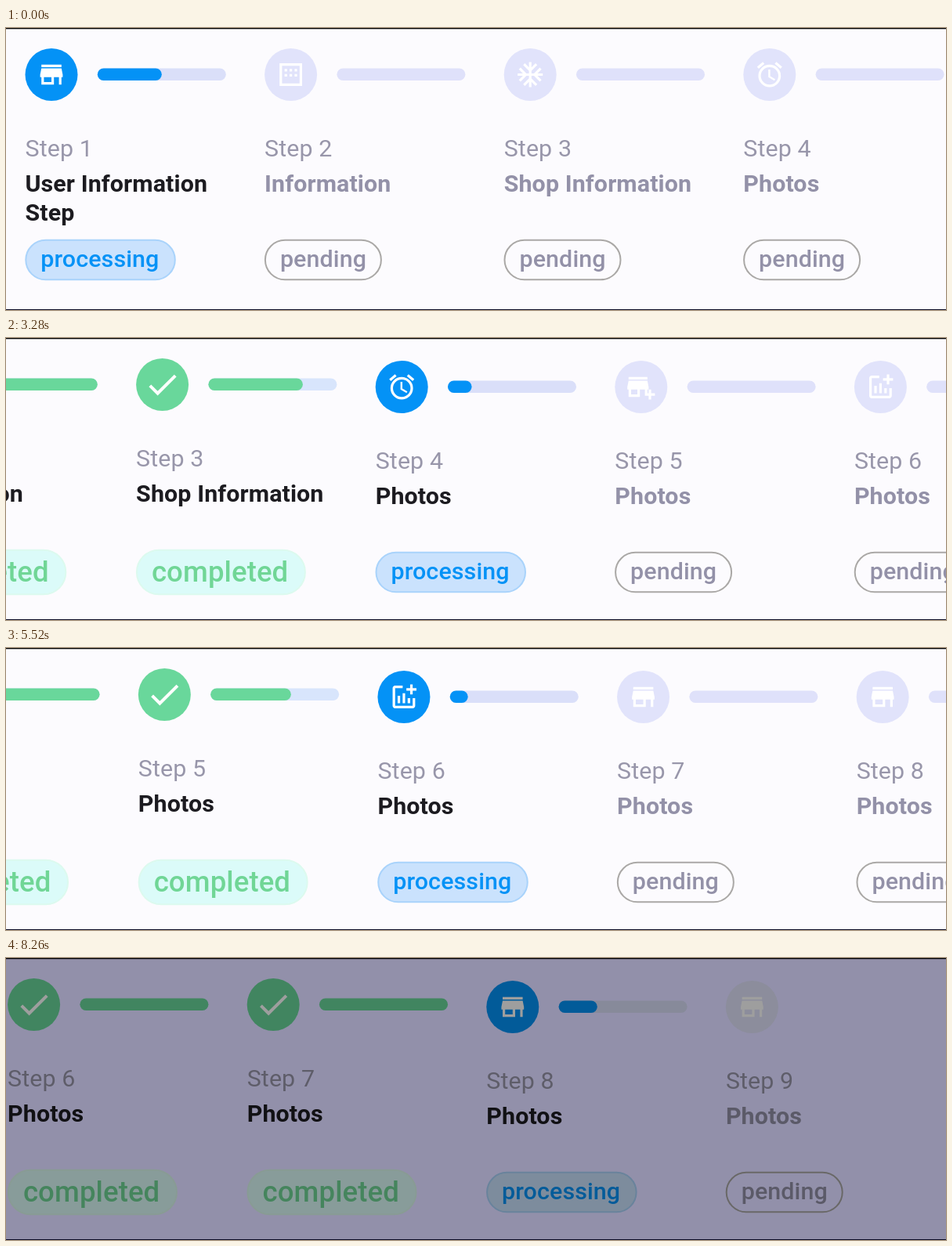
Write an HTML page that moves like this. It is 1200x360 px and loops after 8.32 s.

```html
<!DOCTYPE html>
<html lang="en">
<head>
<meta charset="utf-8">
<title>Horizontal stepper</title>
<style>
  html, body { margin: 0; width: 100%; height: 100%; overflow: hidden; background: #fcfbfe; }
  svg { display: block; width: 1200px; height: 360px; }
  text { font-family: Roboto, sans-serif; font-size: 30.4px; letter-spacing: .1px; }
  .label { fill: #9896aa; }
  .title { font-weight: 700; fill: #1c1b20; }
  .status { font-weight: 500; }
  .icon { fill: #fff; }
  .pill { stroke-width: 2; }

  .pending .title, .pending .status { fill: #9391a8; }
  .pending .disc { fill: #e1e3fb; }
  .pending .track { fill: #dfe1fa; }
  .pending .pill { fill: none; stroke: #aaa8a6; }

  .processing .disc, .processing .fill, .processing .status { fill: #0492f6; }
  .processing .track { fill: #dadff9; }
  .processing .pill { fill: #cae2fd; stroke: #a9d3fb; }

  .completed .disc, .completed .fill { fill: #69d79b; }
  .completed .track { fill: #d8e5fc; }
  .completed .pill { fill: #dbfbf9; stroke: #dcfaef; }
  .completed .status { fill: #70d696; font-size: 36.5px; }
</style>
</head>
<body>
<svg viewBox="0 0 1200 360">
  <rect width="1200" height="360" fill="#fcfbfe"/>
  <rect id="shade" width="1200" height="360" fill="#9290aa" opacity="0"/>
  <g id="strip"></g>
  <rect width="1200" height="1.3"/>
  <rect y="359" width="1200" height="1" fill="#0a0a24"/>
</svg>
<script>
const LOOP = 8320, PITCH = 305.6, VIEW = 1200, BAR = 164;
const FILL_TIME = 1000, SCROLL_TIME = 500;
const DIM_START = 7790, DIM_TIME = 150, DIM_DEPTH = .38;
// Moments at which the stepper advances to the next step.
const ADVANCES = [490, 2040, 2660, 3860, 5055, 6050, 6940];

const ICONS = {
  store: 'M20 4H4v2h16V4zm1 10v-2l-1-5H4l-1 5v2h1v6h10v-6h4v6h2v-6h1zm-9 4H6v-4h6v4z',
  calendar: 'M3 3h18v18H3zM5 5v14h14V5zM7 7.5h2v2H7zm4 0h2v2h-2zm4 0h2v2h-2zM7 11.5h2v2H7zm4 0h2v2h-2zm4 0h2v2h-2z',
  snow: 'M22 11h-4.17l3.24-3.24-1.41-1.42L15 11h-2V9l4.66-4.66-1.42-1.41L13 6.17V2h-2v4.17L7.76 2.93 6.34 4.34 11 9v2H9L4.34 6.34 2.93 7.76 6.17 11H2v2h4.17l-3.24 3.24 1.41 1.42L9 13h2v2l-4.66 4.66 1.42 1.41L11 17.83V22h2v-4.17l3.24 3.24 1.42-1.41L13 15v-2h2l4.66 4.66 1.41-1.42L17.83 13H22z',
  alarm: 'M22 5.72l-4.6-3.86-1.29 1.53 4.6 3.86zM7.88 3.39L6.6 1.86 2 5.71l1.29 1.53zM12.5 8H11v6l4.75 2.85.75-1.23-4-2.37zM12 4a9 9 0 0 0 0 18a9 9 0 0 0 0-18zm0 16a7 7 0 0 1 0-14a7 7 0 0 1 0 14z',
  addStore: 'M15 17h2v-3h1v-2l-1-5H2l-1 5v2h1v6h9v-6h4v3zm-6 1H4v-4h5v4zM2 4h15v2H2zM20 17v-3h-2v3h-3v2h3v3h2v-3h3v-2z',
  addChart: 'M22 5v2h-3v3h-2V7h-3V5h3V2h2v3h3zm-3 14H5V5h6V3H5c-1.1 0-2 .9-2 2v14c0 1.1.9 2 2 2h14c1.1 0 2-.9 2-2v-6h-2v6zm-4-6v4h2v-4h-2zm-4 4h2V9h-2v8zm-2 0v-6H7v6h2z',
  check: 'M9 16.17L4.83 12l-1.42 1.41L9 19 21 7l-1.41-1.41z'
};
const STEPS = [
  ['store', 'User Information', 'Step'],
  ['calendar', 'Information'],
  ['snow', 'Shop Information'],
  ['alarm', 'Photos'],
  ['addStore', 'Photos'],
  ['addChart', 'Photos'],
  ['store', 'Photos'],
  ['store', 'Photos'],
  ['store', 'Photos']
];
const PILLS = {
  pending: { width: 148, height: 50.5, baseline: 305 },
  processing: { width: 190.5, height: 50.5, baseline: 305 },
  completed: { width: 215, height: 56.5, baseline: 311 }
};

function add(parent, tag, attrs, text) {
  const el = document.createElementNS('http://www.w3.org/2000/svg', tag);
  set(el, attrs);
  if (text) el.textContent = text;
  return parent.appendChild(el);
}
function set(el, attrs) {
  for (const key in attrs) el.setAttribute(key, attrs[key]);
}

const strip = document.getElementById('strip');
const shade = document.getElementById('shade');

function buildStep([icon, ...lines], i) {
  const root = add(strip, 'g', {});
  const bar = { x: 92.3, y: 51.5, height: 15.5, rx: 7.75 };
  const isLast = i === STEPS.length - 1;
  add(root, 'circle', { class: 'disc', cx: 33.5, cy: 59.5, r: 33.5 });
  const step = { root, icon, status: '' };
  step.mark = add(root, 'path', { class: 'icon', 'fill-rule': 'evenodd' });
  // Bars connect neighbours, so the last step has none.
  add(root, 'rect', { class: 'track', width: isLast ? 0 : BAR, ...bar });
  step.fill = add(root, 'rect', { class: 'fill', width: 0, ...bar });
  add(root, 'text', { class: 'label', y: 163.5 }, `Step ${i + 1}`);
  lines.forEach((line, n) => add(root, 'text', { class: 'title', y: 209 + 37 * n }, line));
  step.pill = add(root, 'rect', { class: 'pill', x: .8, y: 270.8 });
  step.caption = add(root, 'text', { class: 'status', x: 19.8 });
  return step;
}
const steps = STEPS.map(buildStep);

function setStatus(step, status) {
  if (step.status === status) return;
  step.status = status;
  const done = status === 'completed';
  const { width, height, baseline } = PILLS[status];
  set(step.root, { class: status });
  set(step.mark, {
    d: ICONS[done ? 'check' : step.icon],
    transform: `translate(33.5 59.5) scale(${done ? 2 : 1.6}) translate(-12 -12)`
  });
  set(step.pill, { width, height, rx: height / 2 });
  set(step.caption, { y: baseline });
  step.caption.textContent = status;
}

const clamp = (v, lo = 0, hi = 1) => Math.min(hi, Math.max(lo, v));

// Cubic bezier (.42, 0, .58, 1)
function easeInOut(x) {
  let lo = 0, hi = 1;
  for (let n = 0; n < 20; n++) {
    const u = (lo + hi) / 2, v = 1 - u;
    if (3 * v * v * u * .42 + 3 * v * u * u * .58 + u ** 3 < x) lo = u; else hi = u;
  }
  return lo * lo * (3 - 2 * lo);
}

// Scroll position that centres a step, kept inside the strip.
const scrollFor = i => clamp(PITCH * (i + .5) - VIEW / 2, 0, PITCH * STEPS.length - VIEW);
const restFill = i => i ? .3 : .5;
const progress = (t, n) => clamp((t - ADVANCES[n]) / FILL_TIME);

function fillOf(i, active, t) {
  if (i > active) return 0;
  if (i < active) return restFill(i) + (1 - restFill(i)) * progress(t, i);
  return restFill(i) * (i ? progress(t, i - 1) : 1);
}

function render(t) {
  const active = ADVANCES.filter(start => t >= start).length;
  let scroll = 0;
  if (active) {
    const from = scrollFor(active - 1);
    const e = easeInOut(clamp((t - ADVANCES[active - 1]) / SCROLL_TIME));
    scroll = from + (scrollFor(active) - from) * e;
  }
  steps.forEach((step, i) => {
    setStatus(step, i < active ? 'completed' : i === active ? 'processing' : 'pending');
    // A finished step is taller; the others stay centred beside it.
    const drop = active && i >= active ? 3 : 0;
    set(step.root, { transform: `translate(${24.5 + PITCH * i - scroll} ${drop})` });
    set(step.fill, { width: BAR * fillOf(i, active, t) });
  });
  const dim = clamp((t - DIM_START) / DIM_TIME);
  set(shade, { opacity: dim });
  strip.style.filter = dim ? `brightness(${1 - DIM_DEPTH * dim})` : 'none';
}

const begin = performance.now();
function tick() {
  render((performance.now() - begin) % LOOP);
  requestAnimationFrame(tick);
}
tick();
</script>
</body>
</html>
```
